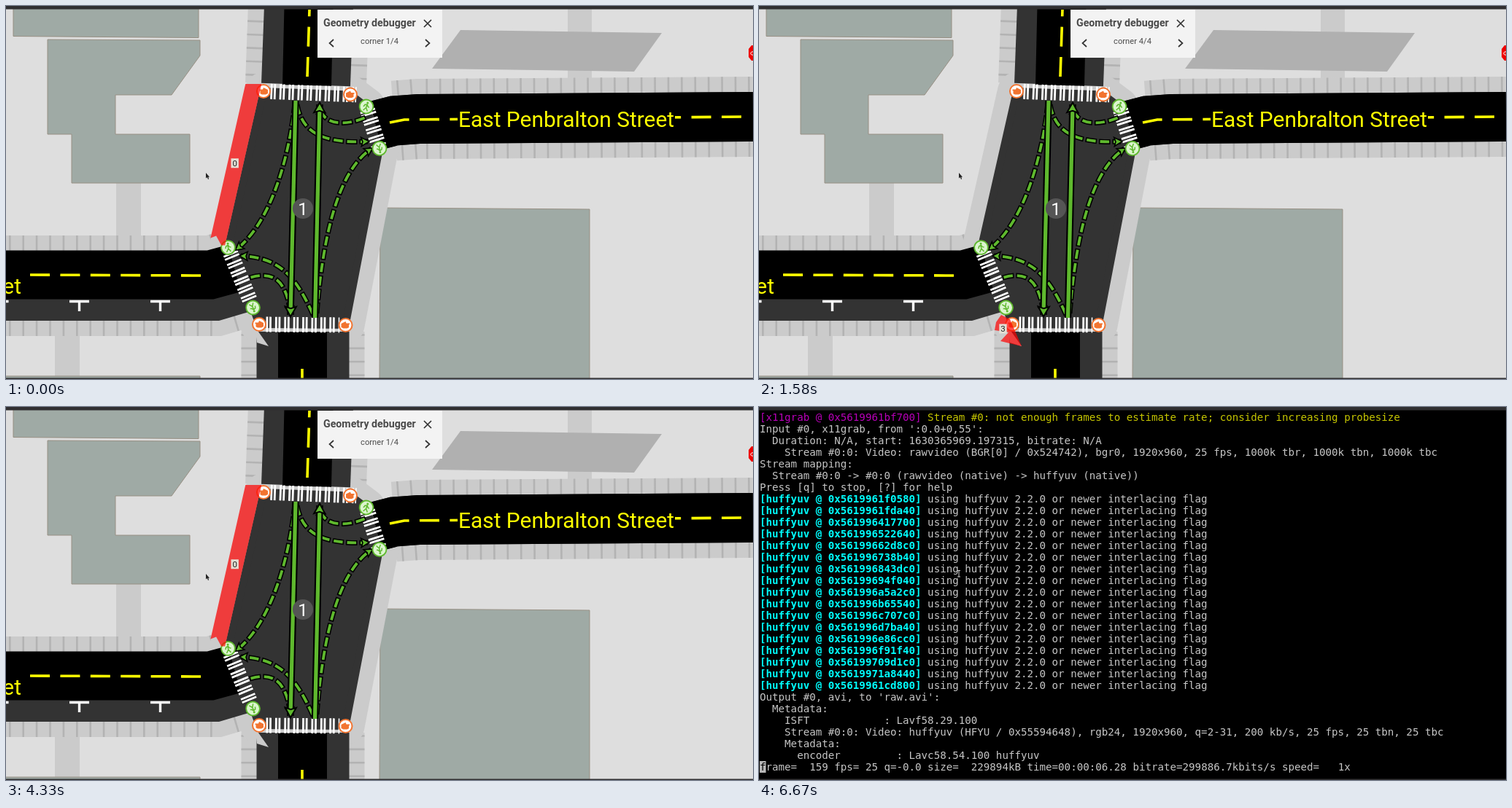
These frames come from a looping animation (1024 by 512 pixels, 6910 ms). An HTML page:

```html
<!DOCTYPE html>
<html lang="en">
<head>
<meta charset="utf-8">
<title>Geometry debugger</title>
<style>
html, body { margin: 0; width: 100%; height: 100%; overflow: hidden; background: #dedede; }
svg { display: block; width: 1024px; height: 512px; font-family: Roboto, sans-serif; }
#term { font: 14.173px "DejaVu Sans Mono", monospace; white-space: pre; fill: #c6c6c6; }
</style>
</head>
<body>
<svg id="stage" viewBox="0 0 1024 512"></svg>
<script>
const LOOP = 6910;
// [start time, screen]: 0-3 are corners, 4 is the terminal
const steps = [[0, 0], [80, 1], [920, 2], [1580, 3], [2920, 2], [3580, 1],
  [4330, 0], [5330, 1], [6170, 2], [6670, 4]];

const WALK = '#cbcbcb', TICK = '#b3b3b3', ASPHALT = '#333', GREEN = '#5fb92e', YELLOW = '#ff0';

// Kerb ends of the four crossings; the junction is built from them
const NW = [353, 117], NE = [472, 121.5], EN = [494, 138], ES = [512, 195.5];
const SE = [465.5, 438], SW = [347, 437], WS = [338.5, 414], WN = [304.5, 331.5];
const kerb = [NW, NE, EN, ES, SE, SW, WS, WN];

const path = (d, stroke, width, extra = '') =>
  `<path d="${d}" fill="none" stroke="${stroke}" stroke-width="${width}" ${extra}/>`;
const poly = (points, fill, extra = '') => `<polygon points="${points}" fill="${fill}" ${extra}/>`;
const rect = (x, y, w, h, fill) => `<rect x="${x}" y="${y}" width="${w}" height="${h}" fill="${fill}"/>`;
const text = (x, y, size, fill, s, extra = '') =>
  `<text x="${x}" y="${y}" font-size="${size}" fill="${fill}" ${extra}>${s}</text>`;
const dash = (pattern, offset = 0) => `stroke-dasharray="${pattern}" stroke-dashoffset="${offset}"`;
const middle = 'text-anchor="middle"';

const building = d => `<path d="${d}" fill="#9faaa5" stroke="#978f83"/>`;
const centreLine = d => path(d, YELLOW, 3.6, dash('27 14.4'));
const junction = (color, width) =>
  poly(kerb, color, `stroke="${color}" stroke-width="${width}" stroke-linejoin="round"`);

// Each road: its line, an extension into the junction, sidewalk and asphalt widths
const roads = [
  { d: 'M415 0L411 108', end: '', walk: 166, asphalt: 122 },
  { d: 'M407 512V447', end: '', walk: 169, asphalt: 127 },
  { d: 'M1024 152L565 155L532 157.5', end: 'L507 164', walk: 110, asphalt: 68 },
  { d: 'M0 384H285L312 376', end: 'L326 372', walk: 138, asphalt: 96 }
];
const lanes = ['M415 0L412.5 109', 'M406.5 512V448', roads[2].d + roads[2].end, 'M0 369H280L313 360'];

function crossing([x1, y1], [x2, y2], from, to) {
  const at = t => `${x1 + (x2 - x1) * t} ${y1 + (y2 - y1) * t}`;
  return path(`M${at(from)}L${at(to)}`, '#fff', 21, dash('2.8 1.8 2.8 5'));
}
function arrowHead([x, y], [fromX, fromY], size) {
  const angle = Math.atan2(y - fromY, x - fromX) * 180 / Math.PI;
  return `<path transform="translate(${x} ${y}) rotate(${angle}) scale(${size})"
    d="M2 0L-9 -6L-7 0L-9 6Z" fill="${GREEN}" stroke="#000" stroke-width="1.6"/>`;
}
function through(a, b) {
  const d = `M${a}L${b}`;
  return path(d, '#000', 9.5) + path(d, GREEN, 5.2) + arrowHead(b, a, 1.25);
}
function turn(a, c1, c2, b) {
  const d = `M${a}C${c1} ${c2} ${b}`;
  return path(d, '#000', 7, dash('15.5 3')) + path(d, GREEN, 3.8, dash('12.5 6', -1.5)) + arrowHead(b, c2, 1);
}
function walker([x, y], angle) {
  return `<g transform="translate(${x} ${y}) rotate(${angle})">
    <circle r="9.4" fill="#dcf5cf" stroke="${GREEN}" stroke-width="1.9"/>
    <circle cx=".5" cy="-5.2" r="1.5" fill="${GREEN}"/>
    ${path('M0 -3V1.5L3 6M0 1.5L-3 6M-3.8 1L-2.5 -2.2L.5 -3L2 -.5L4 .3', GREEN, 1.5)}</g>`;
}
function hand([x, y], flip) {
  return `<g transform="translate(${x} ${y}) scale(${flip} 1)">
    <circle r="9" fill="#fff" stroke="#f27430" stroke-width="2"/>
    <path d="M-6 -2L-2 -4L0 -5L1 -2.5H5.5V-.8H4.5V3.2L2 4.5H-3L-6 3Z" fill="#f27430"/></g>`;
}
function corner(points, [x, y], n) {
  return `<g class="corner" visibility="hidden">${poly(points, '#f00', 'fill-opacity=".7"')}
    ${rect(x - 5.2, y - 6.5, 10.4, 13, '#e4dfd5')}${text(x, y + 4.2, 11.5, '#222', n, middle)}</g>`;
}
// Long corner: a strip beside the line a-b, notched at b
function strip(a, b, side, n) {
  const v = Math.sign(b[1] - a[1]), slope = (a[0] - b[0]) / (a[1] - b[1]);
  const at = (y, off) => [b[0] + slope * (y - b[1]) + side * off, y];
  const top = a[1] - 10 * v, notch = [[13, 27], [16, 20], [3, 10], [3, 5]];
  const points = [at(top, 5), at(top, 27), ...notch.map(([up, off]) => at(b[1] - up * v, off))];
  return corner(points, at((top + b[1] - 7 * v) / 2, 17), n);
}

const land = [
  rect(0, 0, 1024, 512, '#dedede'),
  rect(151, 243, 34, 74, WALK), rect(67, 448, 34, 64, WALK), rect(770, 0, 33, 100, WALK),
  building('M10 0H264V43.500L10 41.500Z'),
  building('M57 46L266 47V68L227 122H150V176H252V243H90V176H57Z'),
  building('M513 277L800 279V514H512Z'),
  building('M-2 508H266V514H-2Z'),
  poly('623,33 899,37 861,90 584,86', '#b0b0b0')
].join('');

const streets = [
  ...roads.map(r => path(r.d, WALK, r.walk)),
  ...roads.map(r => path(r.d, TICK, r.walk, dash('2.6 15.8', -4))),
  junction(WALK, 52),
  ...roads.map(r => path(r.d + r.end, ASPHALT, r.asphalt)),
  junction(ASPHALT, 10),
  ...lanes.map((d, i) => path(d, '#000', i === 2 ? 68 : 67)),
  poly('341,440 360,467 344,462', WALK),
  ...[-10, 100.5, 211.5].map(x => path(`M${x - 13.5} 405.5h27m-13.5 0v13.5`, '#fff', 3.4)),
  centreLine('M413 97L416 5'), centreLine('M406 498V512'), centreLine('M33 369L268 370'),
  centreLine('M526 160L546 156L1010 152'),
  rect(619, 140, 298, 35, '#000'),
  text(620, 166, 29.9, YELLOW, 'East Penbralton Street'),
  text(21, 395, 29.9, YELLOW, 'et', 'text-anchor="end"'),
  crossing(NW, NE, .08, 1.07), crossing(SW, SE, .08, .93),
  crossing(EN, ES, .08, .94), crossing(WN, WS, .09, .9)
].join('');

const traffic = [
  turn([396, 132], [389, 205], [364, 296], [316, 334]),
  turn([399, 135], [406, 175], [436, 189], [496, 186]),
  turn([493, 153], [465, 165], [434, 164], [430, 138]),
  turn([426, 422], [433, 335], [450, 229], [501, 196]),
  turn([421, 424], [397, 370], [374, 345], [322, 343]),
  turn([334, 373], [365, 364], [384, 374], [390, 422]),
  through([397, 130], [390, 424]),
  through([423.5, 428], [430, 135]),
  '<circle cx="407" cy="278" r="14" fill="#555"/>',
  text(407, 286.5, 24, '#fff', 1, middle),
  hand(NW, -1), hand(NE, 1), hand(SW, -1), hand(SE, 1),
  walker(EN, 15), walker(ES, 165), walker(WN, -10), walker(WS, 155)
].join('');

const corners = [
  strip(NW, WN, -1, 0),
  corner('473,108 497,108 511,124 492,133 482,121', [490, 119], 1),
  strip(SE, ES, 1, 2),
  corner('332,424 344,430 360,467 331,460 342,448 323,445 325,434', [334.5, 443], 3)
].join('');

const overlay = [
  '<path d="M1024 54H1022L1018 59V70L1022 75H1024Z" fill="#e00"/>',
  path('M1024 63A2.2 2.2 0 1 0 1024 67', '#fff', 1),
  rect(427, 5, 171, 66, '#f3f3f3'),
  text(435, 27.5, 14.2, '#4a4a4a', 'Geometry debugger', 'font-weight="700"'),
  text(512, 52, 11.2, '#4a4a4a', '', `id="count" ${middle}`),
  path('M573 19l10 10m-10 0l10 -10M449 46l-5.500 5l5.500 5M575 46l5.500 5l-5.500 5', '#333', 1.7),
  '<path d="M274 229v7.500l1.800 -1.500l1.200 3l1 -.5l-.7 -2.700h1.700Z" fill="#222"/>'
].join('');

function terminal() {
  const span = (fill, s, weight = 400) => `<tspan fill="${fill}" font-weight="${weight}">${s}</tspan>`;
  const addresses = ('61f0580 61fda40 6417700 6522640 662d8c0 6738b40 6843dc0 694f040 6a5a2c0 ' +
    '6b65540 6c707c0 6d7ba40 6e86cc0 6f91f40 709d1c0 71a8440 61cd800').split(' ');
  const lines = [
    span('#b800b8', '[x11grab @ 0x5619961bf700]') +
      span('#c6c600', ' Stream #0: not enough frames to estimate rate; consider increasing probesize'),
    "Input #0, x11grab, from ':0.0+0,55':",
    '  Duration: N/A, start: 1630365969.197315, bitrate: N/A',
    '    Stream #0:0: Video: rawvideo (BGR[0] / 0x524742), bgr0, 1920x960, 25 fps, 1000k tbr, 1000k tbn, 1000k tbc',
    'Stream mapping:',
    '  Stream #0:0 -&gt; #0:0 (rawvideo (native) -&gt; huffyuv (native))',
    'Press [q] to stop, [?] for help',
    ...addresses.map(a => span('#0ff', `[huffyuv @ 0x56199${a}]`, 700) +
      ' using huffyuv 2.2.0 or newer interlacing flag'),
    "Output #0, avi, to 'raw.avi':",
    '  Metadata:',
    '    ISFT            : Lavf58.29.100',
    '    Stream #0:0: Video: huffyuv (HFYU / 0x55594648), rgb24, 1920x960, q=2-31, 200 kb/s, 25 fps, 25 tbn, 25 tbc',
    '    Metadata:',
    '      encoder         : Lavc58.54.100 huffyuv',
    span('#000', 'f') + 'rame=  159 fps= 25 q=-0.0 size=  229894kB time=00:00:06.28 bitrate=299886.7kbits/s speed=   1x'
  ];
  return rect(0, 4, 1024, 508, '#000') + rect(1, 486, 8.5, 16, '#b8b8b8') +
    lines.map((s, i) => `<text x="1" y="${18.7 + i * 16}" xml:space="preserve">${s}</text>`).join('') +
    path('M272 224.500h4m-2 0v8.500m-2 0h4', '#ccc', 1);
}

const stage = document.getElementById('stage');
stage.innerHTML = land + streets + traffic + corners + overlay +
  `<g id="term" visibility="hidden">${terminal()}</g>` +
  rect(0, 0, 1024, 4.5, '#302f31') + rect(0, 510.5, 1024, 1.5, '#302f31');

const cornerNodes = stage.querySelectorAll('.corner');
const term = document.getElementById('term');
const count = document.getElementById('count');
const show = (node, on) => node.setAttribute('visibility', on ? 'visible' : 'hidden');

function draw() {
  const t = performance.now() % LOOP;
  const screen = steps.findLast(([start]) => start <= t)[1];
  cornerNodes.forEach((node, i) => show(node, i === screen));
  show(term, screen === 4);
  count.textContent = `corner ${Math.min(screen, 3) + 1}/4`;
  requestAnimationFrame(draw);
}
draw();
</script>
</body>
</html>
```
